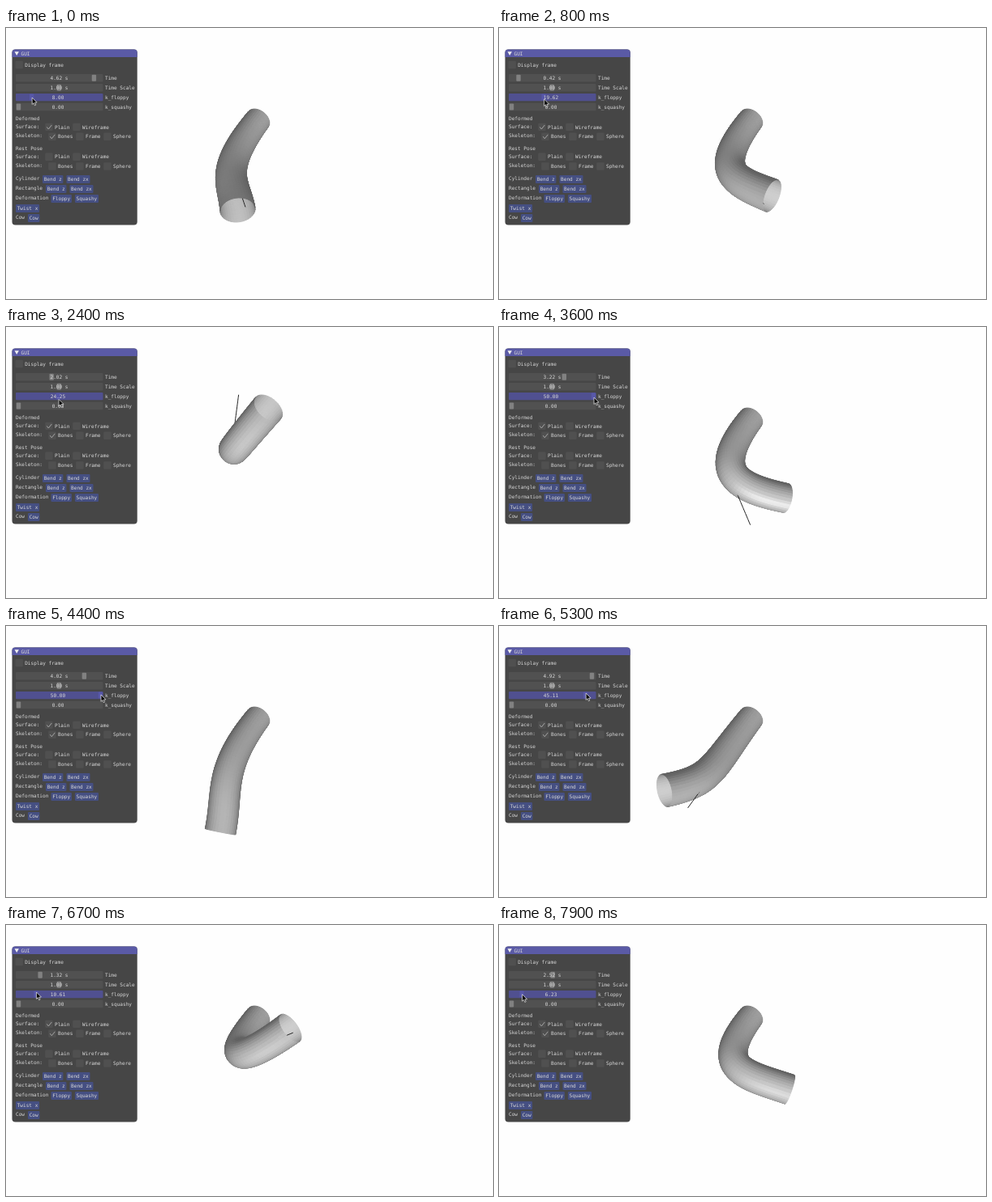
An HTML page with a canvas for the animation above (8 s loop, 600 by 335 pixels).

```html
<!DOCTYPE html>
<html lang="en">
<head>
<meta charset="utf-8">
<title>Floppy tube</title>
<style>
html, body { margin: 0; width: 600px; height: 335px; overflow: hidden; background: #fefefe; }
canvas, svg { position: absolute; left: 0; top: 0; }
text { font: 6.1px "DejaVu Sans Mono", monospace; fill: #d8d8d8; white-space: pre; }
</style>
</head>
<body>
<canvas id="stage" width="600" height="335"></canvas>
<svg id="gui" width="600" height="335"></svg>
<script>
const LOOP = 8000, STEP = 100;
const gui = document.getElementById('gui');
const ctx = document.getElementById('stage').getContext('2d');

// ---------- control panel ----------
function add(tag, attrs, content = '') {
  const node = document.createElementNS('http://www.w3.org/2000/svg', tag);
  for (const key in attrs) node.setAttribute(key, attrs[key]);
  node.textContent = content;
  return gui.appendChild(node);
}
const box = (x, y, width, height, fill, rx = 0) => add('rect', { x, y, width, height, fill, rx });
const label = (x, y, content, anchor = 'start') =>
  add('text', { x, y: y + 2.1, 'text-anchor': anchor }, content);

function checkbox(x, y, name, checked) {
  box(x, y - 4.7, 9.4, 9.4, '#505050', 1);
  if (checked) add('path', { d: `M${x + 2} ${y} l2 2.6 l4 -5`, fill: 'none', stroke: '#a4a4a4' });
  label(x + 11.7, y, name);
}
function slider(row, name, value, active) {
  const y = 61.8 + row * 11.9;
  box(12, y - 4.7, 107.5, 9.4, active ? '#505090' : '#515151', 1);
  const grab = box(12.8, y - 4, 5.4, 8, active ? '#5757a8' : '#818181', 1);
  const text = label(row < 2 ? 65.5 : 64, y, value, 'middle');
  label(122, y, name);
  return { grab, text };
}
function buttons(x, y, ...names) {
  for (const name of names) {
    const width = name.length * 3.67 + 3.4;
    box(x, y - 5, width, 10, '#454f82', 1);
    label(x + width / 2, y, name, 'middle');
    x += width + 4;
  }
}

box(7.5, 26.5, 154.2, 217, '#464646', 4);
add('path', { d: 'M7.5 36 V30.5 Q7.5 26.5 11.5 26.5 H157.7 Q161.7 26.5 161.7 30.5 V36 Z', fill: '#5a5aa6' });
add('path', { d: 'M10.5 29.3 h5.4 l-2.7 4.8 z', fill: '#f0f0f0' });
label(18.5, 31.6, 'GUI');
checkbox(11.5, 45.5, 'Display frame');
const time = slider(0, 'Time', '');
slider(1, 'Time Scale', '1.00 s').grab.setAttribute('x', 62.6);
const floppy = slider(2, 'k_floppy', '', true);
slider(3, 'k_squashy', '0.00');

['Deformed', 'Rest Pose'].forEach((title, i) => {
  const y = 112 + i * 36.8;
  label(12, y, title);
  label(12, y + 9.6, 'Surface:');
  ['Plain', 'Wireframe'].forEach((name, n) => checkbox(48.3 + n * 34, y + 10.4, name, !i && !n));
  label(12, y + 21, 'Skeleton:');
  ['Bones', 'Frame', 'Sphere'].forEach((name, n) => checkbox(52.3 + n * 34, y + 22.2, name, !i && !n));
});

label(12, 186, 'Cylinder');
buttons(45, 187, 'Bend z', 'Bend zx');
label(12, 198, 'Rectangle');
buttons(49, 199, 'Bend z', 'Bend zx');
label(12, 210, 'Deformation');
buttons(55.5, 211, 'Floppy', 'Squashy');
buttons(12, 223, 'Twist x');
label(12, 233.6, 'Cow');
buttons(27, 235, 'Cow');
const cursor = add('path', {
  d: 'M0 0 V8.4 L1.9 6.7 L3.2 9.7 L4.6 9.1 L3.4 6.2 L6 6 Z',
  fill: '#0a0a0a', stroke: '#f4f4f4', 'stroke-width': .7
});

// ---------- motion ----------
// ms, k_floppy, swing and lean of the lower half in degrees
const keys = [
  [0, 8, 9, 50], [800, 19.62, 55, 39], [2400, 24.25, 144, 32], [2800, 36, 80, 5],
  [3600, 50, 59, 0], [5300, 45.11, -62, 30], [5800, 33, 45, 40],
  [6700, 10.61, 117, 28], [7300, 7, 150, 25], [7900, 6.23, 65, 9]
];

// Smooth curve through unevenly spaced keys
function sample(ms) {
  let i = 0;
  while (i < keys.length - 2 && keys[i + 1][0] <= ms) i++;
  const a = keys[i], b = keys[i + 1], span = b[0] - a[0], u = (ms - a[0]) / span;
  const before = keys[i - 1] || a, after = keys[i + 2] || b;
  return a.slice(1).map((p, n) => {
    const q = b[n + 1];
    const m0 = (q - before[n + 1]) / (b[0] - before[0]) * span;
    const m1 = (after[n + 1] - p) / (after[0] - a[0]) * span;
    return p + u * (m0 + u * (3 * (q - p) - 2 * m0 - m1 + u * (2 * (p - q) + m0 + m1)));
  });
}

// ---------- tube ----------
const JOINT = [276, 165], SCALE = 18, DEPTH = 20, RINGS = 40, SIDES = 36, DEG = Math.PI / 180;
const TOP = [2.2, 3.3, -3.05], HANDLE = [-.9, -.75, .5], SAG = [0, -.5, .2];

const dot = (a, b) => a[0] * b[0] + a[1] * b[1] + a[2] * b[2];
const mix = (a, b, k) => a.map((v, i) => v + b[i] * k);
const unit = a => a.map(v => v / Math.hypot(...a));
const cross = (a, b) => [0, 1, 2].map(i => {
  const j = (i + 1) % 3, k = (i + 2) % 3;
  return a[j] * b[k] - a[k] * b[j];
});
const aim = (swing, lean, length) => [
  Math.sin(swing * DEG) * Math.cos(lean * DEG),
  -Math.cos(swing * DEG) * Math.cos(lean * DEG),
  Math.sin(lean * DEG)
].map(v => v * length);
function project([x, y, z]) {
  const k = SCALE * DEPTH / (DEPTH - z);
  return [JOINT[0] + x * k, JOINT[1] - y * k];
}
const LIGHT = unit([0, -.4, .92]);

function tubeRings(end, bend, tilt) {
  const rings = [];
  let side = [1, 0, 0];
  for (let i = 0; i <= RINGS; i++) {
    const s = i / RINGS, r = 1 - s;
    const centre = TOP.map((p, n) =>
      r * r * r * p + 3 * r * r * s * HANDLE[n] + 3 * r * s * s * bend[n] + s * s * s * end[n]);
    const along = unit(TOP.map((p, n) =>
      r * r * (HANDLE[n] - p) + 2 * r * s * (bend[n] - HANDLE[n]) + s * s * (end[n] - bend[n])));
    along[2] += tilt * s * s * s;
    const axis = unit(along);
    side = unit(mix(side, axis, -dot(side, axis)));
    const other = cross(axis, side), ring = [];
    for (let j = 0; j <= SIDES; j++) {
      const a = j / SIDES * 2 * Math.PI;
      const normal = mix(side.map(v => v * Math.cos(a)), other, Math.sin(a));
      ring.push({ p: mix(centre, normal, 1), normal });
    }
    rings.push(ring);
  }
  return rings;
}

function shade(normal, mid) {
  const facing = dot(normal, unit([-mid[0], -mid[1], DEPTH - mid[2]]));
  if (facing < 0) return 122 - 92 * facing;
  const lit = Math.max(0, dot(normal, LIGHT));
  return 98 + 105 * lit ** 1.2 + 36 * lit ** 24;
}

function drawTube(seconds, k, swing, lean) {
  // The bone runs ahead of the floppy surface, now on one side, now on the other
  const lag = Math.min(38, 1.2 * k) * Math.cos(2 * Math.PI * (seconds - 4.6) / 2.5);
  const boneSwing = swing + lag;
  const boneLean = lean + .6 * Math.abs(lag) * Math.max(0, Math.cos(boneSwing * DEG));
  const tip = aim(boneSwing, boneLean, 4.7);
  const end = aim(swing, lean, 5 - .012 * lean);
  const tilt = .8 * Math.max(0, -Math.cos(swing * DEG), -.5 * Math.sin(swing * DEG));
  const rings = tubeRings(end, mix(SAG, tip, .3), tilt), parts = [];

  for (let i = 0; i < RINGS; i++) for (let j = 0; j < SIDES; j++) {
    const corners = [rings[i][j], rings[i][j + 1], rings[i + 1][j + 1], rings[i + 1][j]];
    const mid = [0, 1, 2].map(n => corners.reduce((sum, c) => sum + c.p[n], 0) / 4);
    const grey = shade(unit(mix(corners[0].normal, corners[2].normal, 1)), mid);
    parts.push({ depth: mid[2], points: corners.map(c => project(c.p)), fill: `rgb(${grey},${grey},${grey})` });
  }
  for (let i = 0; i < 24; i++) {
    const ends = [i / 24, (i + 1) / 24].map(part => tip.map(v => v * part));
    parts.push({ depth: ends[0][2], points: ends.map(project) });
  }
  parts.sort((a, b) => a.depth - b.depth);

  ctx.clearRect(0, 0, 600, 335);
  for (const { points, fill } of parts) {
    ctx.beginPath();
    points.forEach(p => ctx.lineTo(...p));
    ctx.strokeStyle = fill || '#222';
    if (fill) {
      ctx.closePath();
      ctx.fillStyle = fill;
      ctx.fill();
    }
    ctx.stroke();
  }
}

function draw(ms) {
  const seconds = (4.624 + ms / 1000) % 5;
  const [strength, swing, lean] = sample(ms);
  const k = Math.min(50, strength);
  time.text.textContent = seconds.toFixed(2) + ' s';
  time.grab.setAttribute('x', 12.8 + seconds * 20.1);
  floppy.text.textContent = k.toFixed(2);
  floppy.grab.setAttribute('x', 12.8 + k * 2.02);
  cursor.setAttribute('transform',
    `translate(${16 + k * 2.02} ${86 + 3.5 * Math.sin(2 * Math.PI * ms / LOOP)})`);
  drawTube(seconds, k, swing, lean);
}

const start = performance.now();
let shown = -1;
function tick() {
  const ms = Math.floor((performance.now() - start) % LOOP / STEP) * STEP;
  if (ms !== shown) draw(shown = ms);
  requestAnimationFrame(tick);
}
tick();
</script>
</body>
</html>
```
